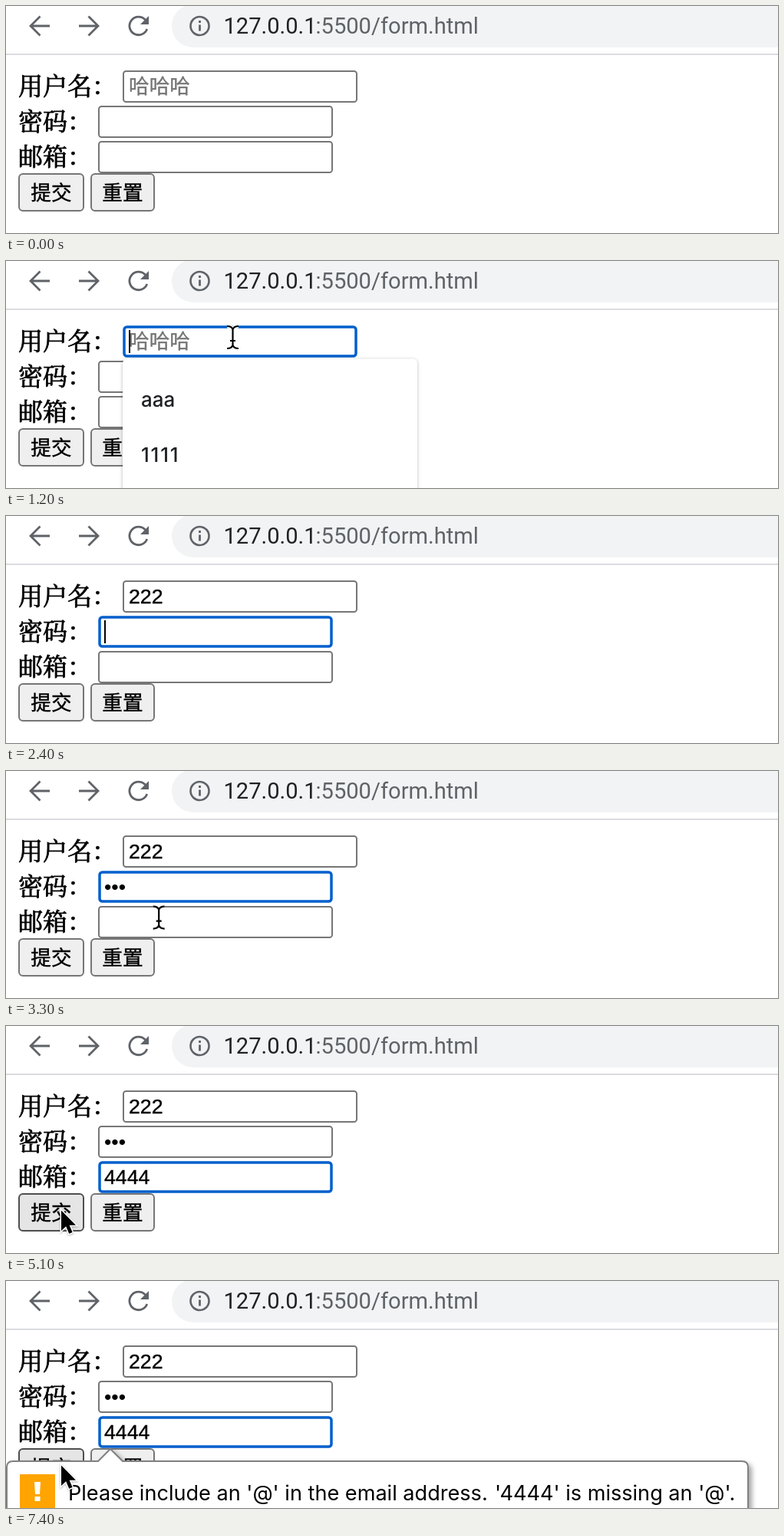
Animation of 1006 by 296 pixels, one loop 7920 ms. Source, as an HTML page:

```html
<!DOCTYPE html>
<html lang="zh-CN">
<head>
<meta charset="utf-8">
<title>form</title>
<style>
  html, body { margin: 0; width: 100%; height: 100%; overflow: hidden; background: #fff; }
  svg { display: block; width: 1006px; height: 296px; }
  text { white-space: pre; font-optical-sizing: none; }
  .url { font: 29.1px Roboto, sans-serif; fill: #5f6368; }
  .label { font: 32px "Noto Serif CJK SC", "Noto Sans CJK SC", "Noto Sans CJK", serif; stroke: #000; stroke-width: .8; }
  .control { font: 26.667px "Liberation Sans", "Noto Sans CJK SC", "Noto Sans CJK", sans-serif; }
  .control text { fill: currentColor; stroke: currentColor; stroke-width: .4; }
  .control .secret { stroke: none; }
  .button text { text-anchor: middle; }
  .item { font: 500 26px Inter, sans-serif; fill: #202124; }
  .digits { letter-spacing: .07em; }
  .message { font: 27.1px Inter, sans-serif; }
  .icon { fill: none; stroke: #5f6368; stroke-width: 2.8; }
  .field rect { fill: #fff; stroke: #767676; stroke-width: 2; }
  .field.focus rect { stroke: #005fcc; stroke-width: 3.5; }
  .button rect { fill: #efefef; stroke: #767676; stroke-width: 2; }
  .button.hover rect { fill: #e5e5e5; stroke: #4f4f4f; }
  .button.active rect { fill: #f5f5f5; stroke: #8d8d8d; }
  #list { filter: drop-shadow(0 1px 2px rgba(0, 0, 0, .28)); }
  #bubble.raised { filter: drop-shadow(4px 4px 3px rgba(0, 0, 0, .35)); }
  #arrow { filter: drop-shadow(0 1px 1px rgba(0, 0, 0, .3)); }
</style>
</head>
<body>
<svg viewBox="0 0 1006 296">
  <rect x="216" y="-2" width="900" height="56" rx="28" fill="#f1f3f4"/>
  <rect y="62" width="1006" height="2" fill="#dadce0"/>
  <g class="icon">
    <path d="M57 26H33M44.5 13.5L32 26L44.5 38.5"/>
    <path d="M95 26H119M107.5 13.5L120 26L107.5 38.5"/>
    <path d="M181.5 18A11.8 11.8 0 1 0 183.8 30"/>
    <path d="M186 13V24H175Z" fill="#5f6368" stroke="none"/>
    <circle cx="252.5" cy="26" r="12" stroke-width="2.6"/>
    <path d="M252.5 24.5V32.5M252.5 19V22"/>
  </g>
  <text class="url" x="283.5" y="36"><tspan fill="#202124">127.0.0.1</tspan><tspan x="403.5">:5500/form.html</tspan></text>

  <g class="label">
    <text x="16" y="116">用户名：</text>
    <text x="16" y="162">密码：</text>
    <text x="16" y="208">邮箱：</text>
  </g>
  <g id="form" class="control"></g>
  <rect id="caret" width="2" height="30"/>

  <g id="list">
    <rect x="152" y="127.5" width="384" height="190" rx="6" fill="#fff"/>
    <text class="item" x="176" y="190">aaa</text>
    <text class="item digits" x="176" y="262">1111</text>
  </g>

  <g id="bubble">
    <path d="M1 310V243Q1 235 9 235H120L136 219L152 235H959Q967 235 967 243V310Z" fill="#fff" stroke="#808080" stroke-width="2"/>
    <rect x="18" y="252" width="46" height="46" fill="#ffa400"/>
    <path d="M37 262H45L44 278H38ZM37.5 281H44.5V287H37.5Z" fill="#fff"/>
    <text class="message" x="81" y="286">Please include an '@' in the email address. <tspan x="637">'4444' is missing an '@'.</tspan></text>
  </g>

  <g id="arrow">
    <path d="M0 0V26.5L6.2 20.8L10.2 30.3L14.6 28.4L10.6 19.2H19Z" stroke="#fff" stroke-width="3" paint-order="stroke"/>
  </g>
  <g id="beam" fill="none">
    <path id="stem" d="M-7.5 -14.5Q-1 -14.5 0 -10Q1 -14.5 7.5 -14.5M-7.5 14.5Q-1 14.5 0 10Q1 14.5 7.5 14.5M0 -10V10M-3.5 4.5H3.5" stroke="#fff" stroke-width="5"/>
    <path id="ink" stroke="#000" stroke-width="2.2"/>
  </g>
</svg>
<script>
const LOOP = 7920, TICK = 50;
const $ = id => document.getElementById(id);
const form = $('form');
$('ink').setAttribute('d', $('stem').getAttribute('d'));

function add(parent, tag, attrs) {
  const el = document.createElementNS('http://www.w3.org/2000/svg', tag);
  for (const key in attrs) el.setAttribute(key, attrs[key]);
  return parent.appendChild(el);
}

function makeField(x, y, char, advance, keys) {
  const group = add(form, 'g', { class: 'field' });
  const box = add(group, 'rect', { rx: 3.5 });
  const text = add(group, 'text', { x: x + 8, y: y + 30 });
  return { x, y, w: 306, h: 42, char, advance, keys, group, box, text };
}

function makeButton(x, w, label) {
  const y = 218, h = 50;
  const group = add(form, 'g', { class: 'button' });
  add(group, 'rect', { x: x + 1, y: y + 1, width: w - 2, height: h - 2, rx: 5 });
  add(group, 'text', { x: x + w / 2, y: 253 }).textContent = label;
  return { x, y, w, h, group };
}

// The last list holds the time of each key press.
const user = makeField(152, 84, '2', 14.6, [1650, 1750, 1850]);
const pass = makeField(120, 130, '•', 9.34, [2700, 2750, 2900]);
const mail = makeField(120, 176, '4', 14.6, [3700, 4000, 4200, 4300]);
const fields = [user, pass, mail];
pass.text.setAttribute('class', 'secret');
const submit = makeButton(16, 86, '提交');
const reset = makeButton(110, 84, '重置');

const focusAt = [[0, null], [1050, user], [2250, pass], [3450, mail], [5150, null], [5250, mail]];
const caretOn = [[1050, 1300], [1650, 2050], [2250, 3100], [3450, 3900], [4000, 4450],
  [5250, 5450], [6200, 6450], [7150, 7400]];

// Each trip: shown, hidden, move start, move end, start point, end point.
const trips = [
  [300, 1650, 500, 1050, [262, 242], [295.5, 99.5]],
  [1900, 2400, 1900, 2200, [295.5, 99.5], [218, 146.5]],
  [2950, 3700, 2900, 3450, [218, 146.5], [195, 201]],
  [4200, LOOP, 4200, 5050, [181, 203.5], [72, 240.5]]
];

const within = (t, [from, to]) => t >= from && t < to;
const show = (el, on) => { el.style.display = on ? '' : 'none'; };
const hit = (b, p) => p && p[0] >= b.x && p[0] < b.x + b.w && p[1] >= b.y && p[1] < b.y + b.h;

function pointer(t) {
  const trip = trips.find(item => within(t, item));
  if (!trip) return null;
  const [, , start, end, a, b] = trip;
  const k = Math.min(1, Math.max(0, (t - start) / (end - start)));
  const e = k * k * (3 - 2 * k);
  return a.map((v, i) => v + (b[i] - v) * e);
}

function drawField(f, t, focused) {
  const count = f.keys.filter(key => key <= t).length;
  const hint = f === user && !count;
  f.text.textContent = hint ? '哈哈哈' : f.char.repeat(count);
  f.text.setAttribute('color', hint ? '#757575' : '#000');
  f.group.setAttribute('class', focused ? 'field focus' : 'field');
  const inset = focused ? 2 : 1;
  const box = { x: f.x + inset, y: f.y + inset, width: f.w - 2 * inset, height: f.h - 2 * inset };
  for (const key in box) f.box.setAttribute(key, box[key]);
  if (focused) {
    $('caret').setAttribute('x', f.x + 8 + Math.floor(count * f.advance));
    $('caret').setAttribute('y', f.y + 6);
  }
}

function draw(time) {
  const t = Math.floor(time / TICK) * TICK;
  const focus = focusAt.filter(([at]) => at <= t).pop()[1];
  const p = pointer(t);
  fields.forEach(f => drawField(f, t, f === focus));
  show($('caret'), focus && caretOn.some(span => within(t, span)));

  const pressed = within(t, [5150, 5250]);
  for (const b of [submit, reset]) {
    const state = hit(b, p) ? (pressed ? ' active' : ' hover') : '';
    b.group.setAttribute('class', 'button' + state);
  }

  show($('list'), within(t, [1200, 1650]));
  show($('bubble'), t >= 5450);
  $('bubble').setAttribute('class', t >= 6200 ? 'raised' : '');

  const overText = fields.some(f => hit(f, p));
  show($('arrow'), p && !overText);
  show($('beam'), p && overText);
  if (p) $(overText ? 'beam' : 'arrow').setAttribute('transform', `translate(${p})`);
}

const origin = performance.now();
function run() {
  draw((performance.now() - origin) % LOOP);
  requestAnimationFrame(run);
}
run();
</script>
</body>
</html>
```
